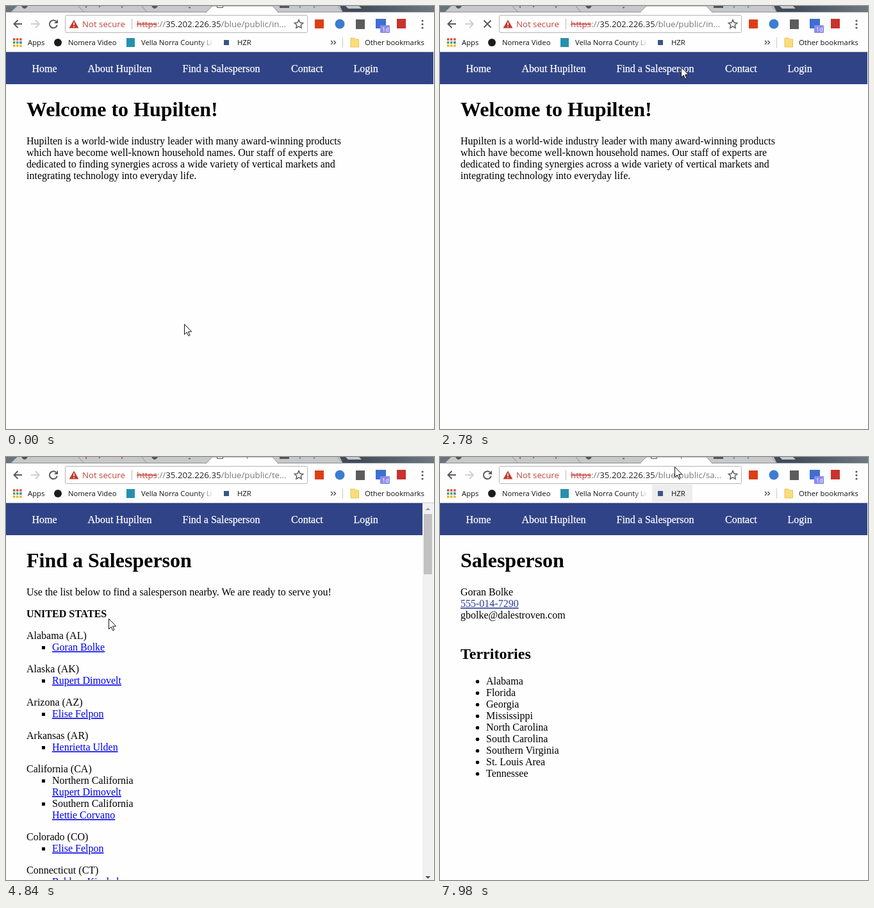
Animation of 668x660 px, one loop 8 s. Source, as an HTML page:

```html
<!DOCTYPE html>
<html lang="en">
<head>
<meta charset="utf-8">
<title>Find a Salesperson</title>
<style>
html, body { margin: 0; width: 100%; height: 100%; overflow: hidden; background: #fefefe; }
svg { display: block; width: 668px; height: 660px; }
text { white-space: pre; }
.ui { font: 11.3px "Open Sans", "Noto Sans", sans-serif; fill: #111; }
.url { font-size: 13.26px; fill: #777; }
.doc { font: 16px "Liberation Serif", "Times New Roman", serif; fill: #000; }
.h1 { font-size: 32px; font-weight: bold; }
.h2 { font-size: 24px; font-weight: bold; }
.b { font-weight: bold; }
.nav { fill: #fff; stroke: #fff; stroke-width: .25; }
.link { fill: #00e; text-decoration: underline; }
.tel { fill: #2a3c9c; text-decoration: underline; }
.line { fill: none; stroke: #5a5a5a; stroke-width: 2; }

.home, .list, .person, .idle, .busy, .icon, .title, .hover, #cursor, .arrow, .hand, .beam {
  animation: 8s step-end infinite;
}
.home { animation-name: home; }
.list { animation-name: list; }
.person { animation-name: person; }
.idle { animation-name: idle; }
.busy { animation-name: busy; }
.icon { animation-name: icon; }
.title { animation-name: title; }
.hover { animation-name: hover; }
.arrow { animation-name: arrow; }
.hand { animation-name: hand; }
.beam { animation-name: beam; }
#cursor { animation-name: move; }

@keyframes home { 0% { opacity: 1 } 38.24%, 100% { opacity: 0 } }
@keyframes list { 0%, 79.87%, 100% { opacity: 0 } 38.24% { opacity: 1 } }
@keyframes person { 0% { opacity: 0 } 79.87%, 100% { opacity: 1 } }
@keyframes idle { 0%, 39.74%, 79.87%, 100% { opacity: 1 } 34.74%, 74.62% { opacity: 0 } }
@keyframes busy { 0%, 39.74%, 79.87%, 100% { opacity: 0 } 34.74%, 74.62% { opacity: 1 } }
@keyframes icon { 0%, 39.74%, 79.87%, 100% { opacity: 1 } 32.87%, 74.62% { opacity: 0 } }
@keyframes title { 0% { opacity: 0 } 38.24%, 100% { opacity: 1 } }
@keyframes hover { 0% { opacity: 0 } 96.74%, 100% { opacity: 1 } }
@keyframes arrow {
  0%, 34.74%, 58.99%, 74.62%, 91.87%, 100% { opacity: 1 }
  20.24%, 57.12%, 65.74%, 76.12% { opacity: 0 }
}
@keyframes hand {
  0%, 34.74%, 74.62%, 91.87%, 100% { opacity: 0 }
  20.24%, 65.74%, 76.12% { opacity: 1 }
}
@keyframes beam { 0%, 58.99%, 100% { opacity: 0 } 57.12% { opacity: 1 } }
@keyframes move {
  0% { transform: translate(278px, 496px) }
  1.49% { transform: translate(346px, 428px) }
  3.37% { transform: translate(391px, 346px) }
  4.87% { transform: translate(424px, 287px) }
  6.74% { transform: translate(454px, 236px) }
  8.24% { transform: translate(472px, 196px) }
  10.12% { transform: translate(482px, 165px) }
  11.62% { transform: translate(489px, 141px) }
  13.12% { transform: translate(492px, 127px) }
  14.99% { transform: translate(480px, 118px) }
  16.87% { transform: translate(448px, 107px) }
  18.37% { transform: translate(419px, 103px) }
  20.24% { transform: translate(387px, 95px) }
  22.12% { transform: translate(381px, 94px) }
  23.74% { transform: translate(379px, 93px) }
  25.62% { transform: translate(376px, 95px) }
  53.62% { transform: translate(347px, 128px) }
  55.12% { transform: translate(307px, 166px) }
  57.12% { transform: translate(251px, 205px) }
  58.99% { transform: translate(200px, 231px) }
  60.49% { transform: translate(160px, 252px) }
  62.37% { transform: translate(144px, 271px) }
  64.24% { transform: translate(132px, 281px) }
  65.74% { transform: translate(126px, 289px) }
  67.24% { transform: translate(123px, 293px) }
  69.24% { transform: translate(122px, 296px) }
  71.12% { transform: translate(122px, 297px) }
  91.87% { transform: translate(210px, 262px) }
  93.37% { transform: translate(323px, 170px) }
  95.24% { transform: translate(342px, 126px) }
  96.74% { transform: translate(356px, 62px) }
  98.24% { transform: translate(364px, 32px) }
  99.74%, 100% { transform: translate(366px, 15px) }
}
</style>
</head>
<body>
<svg viewBox="0 0 668 660">
  <defs>
    <linearGradient id="sky">
      <stop offset="0" stop-color="#6a747c"/>
      <stop offset=".82" stop-color="#3f4b59"/>
      <stop offset="1" stop-color="#6d7883"/>
    </linearGradient>
    <linearGradient id="fade">
      <stop offset="0" stop-color="#fefefe" stop-opacity="0"/>
      <stop offset="1" stop-color="#fefefe"/>
    </linearGradient>
  </defs>
  <rect width="668" height="660" fill="#fefefe"/>

  <!-- tab strip -->
  <rect width="668" height="10" fill="url(#sky)"/>
  <path d="M7 10L18 0H521L526 10Z" fill="#c6c8ca"/>
  <path d="M530 0H551L555 4H534Z" fill="#c6c8ca"/>
  <path d="M7 10L17 0M113 0L122 10M212 0L220 10M518 0L526 10M0 9.500H313M424 9.500H668" fill="none" stroke="#8d9194"/>
  <path d="M312 10L322 0H416L425 10Z" fill="#fefefe" stroke="#8d9194"/>
  <rect x="313" y="9" width="111" height="2" fill="#fefefe"/>
  <path d="M24 0Q29 8 34 0ZM227 0Q232 8 237 0ZM427 0H442V3H427Z" fill="#555"/>
  <g fill="none" stroke-width="1.500">
    <path d="M285 2.500H288" stroke="#555"/>
    <path d="M125 0V3M146 0V2M181 0V3" stroke="#b0443c"/>
    <path d="M459 0V3M481 0V3" stroke="#4a8fa0"/>
  </g>
  <path class="icon" d="M329.500 0V2.500H338.500V0" fill="none" stroke="#555"/>
  <path class="title" d="M376.500 0V3" stroke="#7a6ab0"/>

  <!-- toolbar -->
  <path class="line" d="M25 28H12.500M18.500 22L12.500 28L18.500 34"/>
  <path class="line" d="M39 28H52M46 22L52 28L46 34" style="stroke:#d0d0d0"/>
  <g class="idle">
    <path class="line" d="M78.200 24A6 6 0 1 0 79.800 29.500"/>
    <path d="M81 21V27H75Z" fill="#5a5a5a"/>
  </g>
  <path class="busy line" d="M68.500 22.500L79.500 33.500M79.500 22.500L68.500 33.500"/>
  <rect x="92.500" y="14.500" width="378" height="27" rx="2" fill="#fff" stroke="#b5b5b5"/>
  <path d="M106 21.500L113.500 34.500H98.500Z" fill="#c23a2e"/>
  <path d="M106 25.500V30M106 31.500V33" stroke="#fff" stroke-width="1.500"/>
  <path d="M196.500 20V36" stroke="#bbb"/>
  <g class="ui url">
    <text x="119" y="33" fill="#c0433a">Not secure</text>
    <text x="204" y="33"><tspan fill="#c0433a" text-decoration="line-through">https</tspan>://<tspan fill="#222">35.202.226.35</tspan>/blue/public/</text>
    <text class="home" x="414.900" y="33">in...</text>
    <text class="list" x="414.900" y="33">te...</text>
    <text class="person" x="414.900" y="33">sa...</text>
  </g>
  <path d="M457 21.500L459 26L463.700 26.500L460.200 29.700L461.200 34.300L457 31.900L452.800 34.300L453.800 29.700L450.300 26.500L455 26Z" fill="none" stroke="#5a5a5a" stroke-width="1.400"/>
  <rect x="482" y="21" width="14" height="14" fill="#dc3e15"/>
  <circle cx="521" cy="28" r="7.500" fill="#3b7dd0"/>
  <rect x="546" y="21" width="14" height="15" fill="#5c5c5c"/>
  <rect x="577" y="20" width="16" height="15" fill="#3f6fce"/>
  <rect x="584" y="30" width="15" height="12" rx="1" fill="#8c8cf0"/>
  <text class="ui" x="587" y="39.500" style="font-size:9px;fill:#fff">1d</text>
  <rect x="610" y="20" width="14" height="15" fill="#c8322f"/>
  <path d="M650 23V34.500" stroke="#5a5a5a" stroke-width="3.200" stroke-linecap="round" stroke-dasharray="0 5.500"/>

  <!-- bookmarks -->
  <g fill="none" stroke-width="3.400" stroke-dasharray="3.400 1.700">
    <path d="M11 52H25" stroke="#dd4b39"/>
    <path d="M11 57H25" stroke="#3fa45b"/>
    <path d="M11 62H25" stroke="#eeb211"/>
    <path d="M21.200 57H25" stroke="#4a86e0"/>
  </g>
  <rect class="hover" x="331" y="43" width="63" height="27" fill="#ededed"/>
  <circle cx="81" cy="57" r="6" fill="#1b1b1b"/>
  <rect x="188" y="50" width="13" height="14" fill="#2591ad"/>
  <rect x="340" y="53" width="8" height="8" fill="#3b5488"/>
  <path d="M538 50H544L545.500 52H550.500V64H538Z" fill="#fbdc7c" stroke="#e8c257"/>
  <path d="M525.500 49V65" stroke="#ccc"/>
  <g class="ui">
    <text x="34" y="61">Apps</text>
    <text x="97" y="61">Nomera Video</text>
    <text x="211" y="61">Vella Norra County Li</text>
    <text x="361" y="61">HZR</text>
    <text x="560" y="61">Other bookmarks</text>
  </g>
  <rect x="300" y="46" width="26" height="22" fill="url(#fade)"/>
  <path class="line" d="M507 54L510 57L507 60M511.500 54L514.500 57L511.500 60" style="stroke-width:1.5"/>
  <path d="M0 71.500H668" stroke="#c9cbcd"/>

  <!-- page -->
  <rect y="72" width="667" height="50" fill="#304387"/>
  <g class="doc nav">
    <text x="40.500" y="103">Home</text>
    <text x="127.500" y="103">About Hupilten</text>
    <text x="275.500" y="103">Find a Salesperson</text>
    <text x="445" y="103">Contact</text>
    <text x="542.500" y="103">Login</text>
  </g>

  <g class="doc home">
    <text class="h1" x="32" y="172">Welcome to Hupilten!</text>
    <text x="32" y="216">Hupilten is a world-wide industry leader with many award-winning products</text>
    <text x="32" y="234">which have become well-known household names. Our staff of experts are</text>
    <text x="32" y="252">dedicated to finding synergies across a wide variety of vertical markets and</text>
    <text x="32" y="270">integrating technology into everyday life.</text>
  </g>

  <g class="doc list">
    <text class="h1" x="32" y="172">Find a Salesperson</text>
    <text x="32" y="216">Use the list below to find a salesperson nearby. We are ready to serve you!</text>
    <text class="b" x="32" y="250">UNITED STATES</text>
    <text x="32" y="284">Alabama (AL)</text>
    <text class="link" x="72" y="302">Goran Bolke</text>
    <text x="32" y="336">Alaska (AK)</text>
    <text class="link" x="72" y="354">Rupert Dimovelt</text>
    <text x="32" y="388">Arizona (AZ)</text>
    <text class="link" x="72" y="406">Elise Felpon</text>
    <text x="32" y="440">Arkansas (AR)</text>
    <text class="link" x="72" y="458">Henrietta Ulden</text>
    <text x="32" y="492">California (CA)</text>
    <text x="72" y="510">Northern California</text>
    <text class="link" x="72" y="528">Rupert Dimovelt</text>
    <text x="72" y="546">Southern California</text>
    <text class="link" x="72" y="564">Hettie Corvano</text>
    <text x="32" y="598">Colorado (CO)</text>
    <text class="link" x="72" y="616">Elise Felpon</text>
    <text x="32" y="650">Connecticut (CT)</text>
    <text class="link" x="72" y="668">Beldora Kinshel</text>
    <path d="M56 297.500h5m-5 52h5m-5 52h5m-5 52h5m-5 52h5m-5 36h5m-5 70h5" stroke="#000" stroke-width="5"/>
    <rect x="650" y="72" width="17" height="588" fill="#f1f1f1"/>
    <rect x="652" y="89" width="13" height="94" fill="#c1c1c1"/>
    <path d="M654.500 83L658.500 79L662.500 83Z" fill="#a3a3a3"/>
    <path d="M654.500 654L658.500 658L662.500 654Z" fill="#505050"/>
  </g>

  <g class="doc person">
    <text class="h1" x="32" y="172">Salesperson</text>
    <text x="32" y="216">Goran Bolke</text>
    <text class="tel" x="32" y="234">555-014-7290</text>
    <text x="32" y="252">gbolke@dalestroven.com</text>
    <text class="h2" x="32" y="315">Territories</text>
    <text x="72" y="355">Alabama</text>
    <text x="72" y="373">Florida</text>
    <text x="72" y="391">Georgia</text>
    <text x="72" y="409">Mississippi</text>
    <text x="72" y="427">North Carolina</text>
    <text x="72" y="445">South Carolina</text>
    <text x="72" y="463">Southern Virginia</text>
    <text x="72" y="481">St. Louis Area</text>
    <text x="72" y="499">Tennessee</text>
    <path d="M58.500 350.500V495" stroke="#000" stroke-width="5.500" stroke-linecap="round" stroke-dasharray="0 18"/>
  </g>

  <g id="cursor" fill="#fff" stroke="#111">
    <path class="arrow" d="M.5 .5V16.500L4.200 13L6.700 18.700L9 17.700L6.500 12.100H11.700Z"/>
    <g class="hand">
      <path d="M-1 12V2Q-1 .5 .5 .5T2 2V8Q2 6.500 3.500 6.500T5 8Q5 7 6.500 7T8 8.500Q8 8 9.500 8T11 9.700V15L9 19V21.500H-.5V19.500L-4.300 14Q-5 12 -3.500 11.500Q-2.500 11.200 -1 13Z"/>
      <path d="M2 8V12M5 8V12M8 8.500V12"/>
    </g>
    <path class="beam" d="M-3 -7.500H4M.5 -7.500V7.500M-3 7.500H4" fill="none"/>
  </g>
</svg>
</body>
</html>
```
